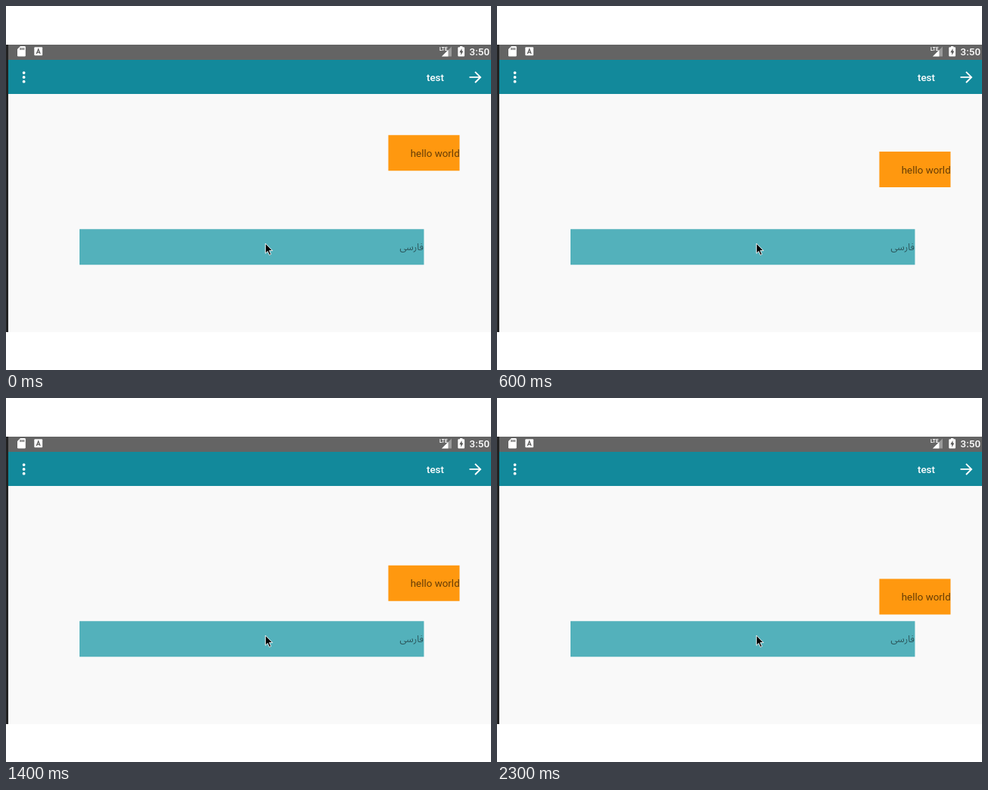
Recreate the animation shown at these times as an HTML page. Size 640 px wide and 480 px high, loop 2400 ms.

```html
<!DOCTYPE html>
<html lang="en">
<head>
<meta charset="utf-8">
<title>Moving box</title>
<style>
  html, body { margin: 0; width: 100%; height: 100%; overflow: hidden; background: #fff; }
  svg { display: block; width: 640px; height: 480px; }
  text { font: 13.4px Roboto, sans-serif; text-anchor: end; }
  .bar { font-weight: 500; fill: #fff; }
  .farsi { font: 12px "Noto Sans Arabic", "Noto Naskh Arabic", "DejaVu Sans", sans-serif; }
  .tiny { font: bold 6.5px Roboto, sans-serif; text-anchor: start; }
</style>
</head>
<body>
<svg viewBox="0 0 640 480">
  <!-- screen -->
  <path fill="#222" d="M0 51h3v379H0z"/>
  <path fill="#f9f9f9" d="M3 116h637v314H3z"/>
  <path fill="#646464" d="M3 51h637v20H3z"/>
  <path fill="#12899b" d="M3 71h637v45H3z"/>

  <!-- status bar -->
  <g fill="#fff">
    <path d="M19 53h5.5q1.3 0 1.3 1.3v11q0 1.3-1.3 1.3h-8.2q-1.3 0-1.3-1.3V57z"/>
    <path fill="#646464" d="M18.4 55h1.3v3h-1.3zm2.2 0h1.3v3h-1.3zm2.2 0h1.3v3h-1.3z"/>
    <rect x="37.3" y="54.3" width="10.8" height="11" rx="1"/>
    <path d="M40.3 63l2.4-6.2L45.1 63M41.1 61.2h3.2" fill="none" stroke="#555" stroke-width="1.2"/>
    <path fill="#999" d="M588 53.5v13h-13z"/>
    <path d="M583.5 58v8.5H575z"/>
    <text class="tiny" x="572" y="58.5">LTE</text>
    <path d="M599 53h3.4v1.3h1.7q1 0 1 1v10.2q0 1-1 1h-6.8q-1 0-1-1V55.300q0-1 1-1H599z"/>
    <path fill="#555" d="M601.5 56l-3.2 5.2h2v3.700l3-5.300h-1.800z"/>
  </g>
  <text class="bar" x="638" y="65">3:50</text>

  <!-- toolbar -->
  <g fill="#fff">
    <circle cx="23.6" cy="88.100" r="1.9"/>
    <circle cx="23.6" cy="93.900" r="1.9"/>
    <circle cx="23.6" cy="99.700" r="1.9"/>
  </g>
  <text class="bar" x="578" y="98.500">test</text>
  <path d="M611.500 93.900H626M619 86.800l7.100 7.100-7.100 7.100" fill="none" stroke="#fff" stroke-width="1.900"/>

  <!-- content -->
  <g id="box">
    <path fill="#ff980f" d="M504.500 0h94v47h-94z"/>
    <text x="598.700" y="28.700" fill="#663d06">hello world</text>
  </g>
  <path fill="#53b1bb" d="M97 294.300h454.500v47H97z"/>
  <text class="farsi" x="551" y="322" fill="#2b555a">فارسی</text>
  <path d="M342.300 313v13.200l3-2.800 2.200 5 2.200-1-2.200-4.800h4.200z" fill="#000" stroke="#fff" stroke-width=".9"/>
</svg>
<script>
const LOOP = 2400, STEP = 100, TOP = 170.3;
const box = document.getElementById("box");
const start = performance.now();

// Steady descent that quickens slightly before it stops.
function boxTop(time) {
  const step = Math.floor(time / STEP);
  const slow = Math.min(step, 14) * 3.6;
  const fast = Math.min(Math.max(step - 14, 0), 4) * 4.43;
  return TOP + slow + fast;
}

function draw(now) {
  const time = Math.max(0, now - start) % LOOP;
  box.setAttribute("transform", `translate(0 ${boxTop(time).toFixed(2)})`);
  requestAnimationFrame(draw);
}
draw(start);
</script>
</body>
</html>
```
